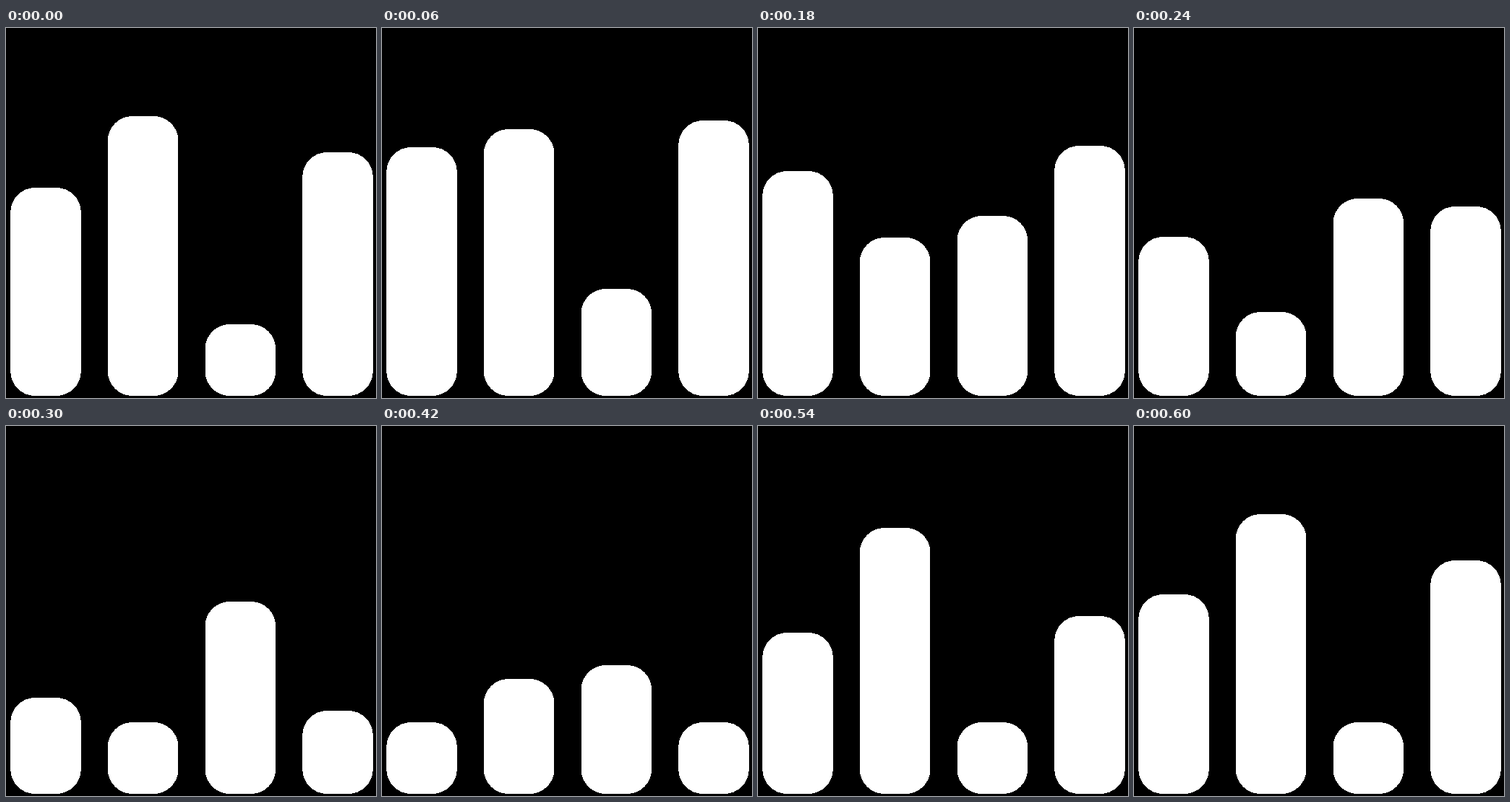
Recreate the animation shown at these times as an HTML page. Size 512 by 512 pixels, loop 660 ms.

```html
<!DOCTYPE html>
<html lang="en">
<head>
<meta charset="utf-8">
<title>Equalizer</title>
<style>
  html, body { margin: 0; width: 100%; height: 100%; overflow: hidden; background: #000; }
  svg { display: block; width: 100vw; height: 100vh; }
</style>
</head>
<body>
<svg viewBox="0 0 512 512" fill="#fff" shape-rendering="crispEdges"></svg>
<script>
const LOOP = 660, STEP = 60, KEY_GAP = 123;
const BOTTOM = 509, SHORTEST = 410;
const svg = document.querySelector('svg');

// Key points of each bar's top edge, evenly spaced around its cycle
const paths = [
  [221, 140, 297, 443, 330],
  [122, 194, 400, 445, 187],
  [410, 299, 235, 280, 402],
  [172, 120, 257, 532, 334]
];

// Closed Catmull-Rom curve through the key points
function curve(keys, pos) {
  const i = Math.floor(pos), u = pos - i;
  const [a, b, c, d] = [-1, 0, 1, 2].map(k => keys[(i + k + keys.length) % keys.length]);
  return b + u / 2 * (c - a + u * (2 * a - 5 * b + 4 * c - d + u * (3 * (b - c) + d - a)));
}

const bars = paths.map((keys, i) => {
  const rect = document.createElementNS('http://www.w3.org/2000/svg', 'rect');
  const attrs = { x: 6.2 + 134.67 * i, width: 97.6, rx: 34 };
  for (const name in attrs) rect.setAttribute(name, attrs[name]);
  svg.append(rect);
  return { rect, keys };
});

function draw() {
  const time = Math.floor(performance.now() % LOOP / STEP) * STEP;
  for (const { rect, keys } of bars) {
    const top = Math.min(SHORTEST, Math.round(curve(keys, time / KEY_GAP)));
    rect.setAttribute('y', top);
    rect.setAttribute('height', BOTTOM - top);
  }
  requestAnimationFrame(draw);
}
draw();
</script>
</body>
</html>
```
